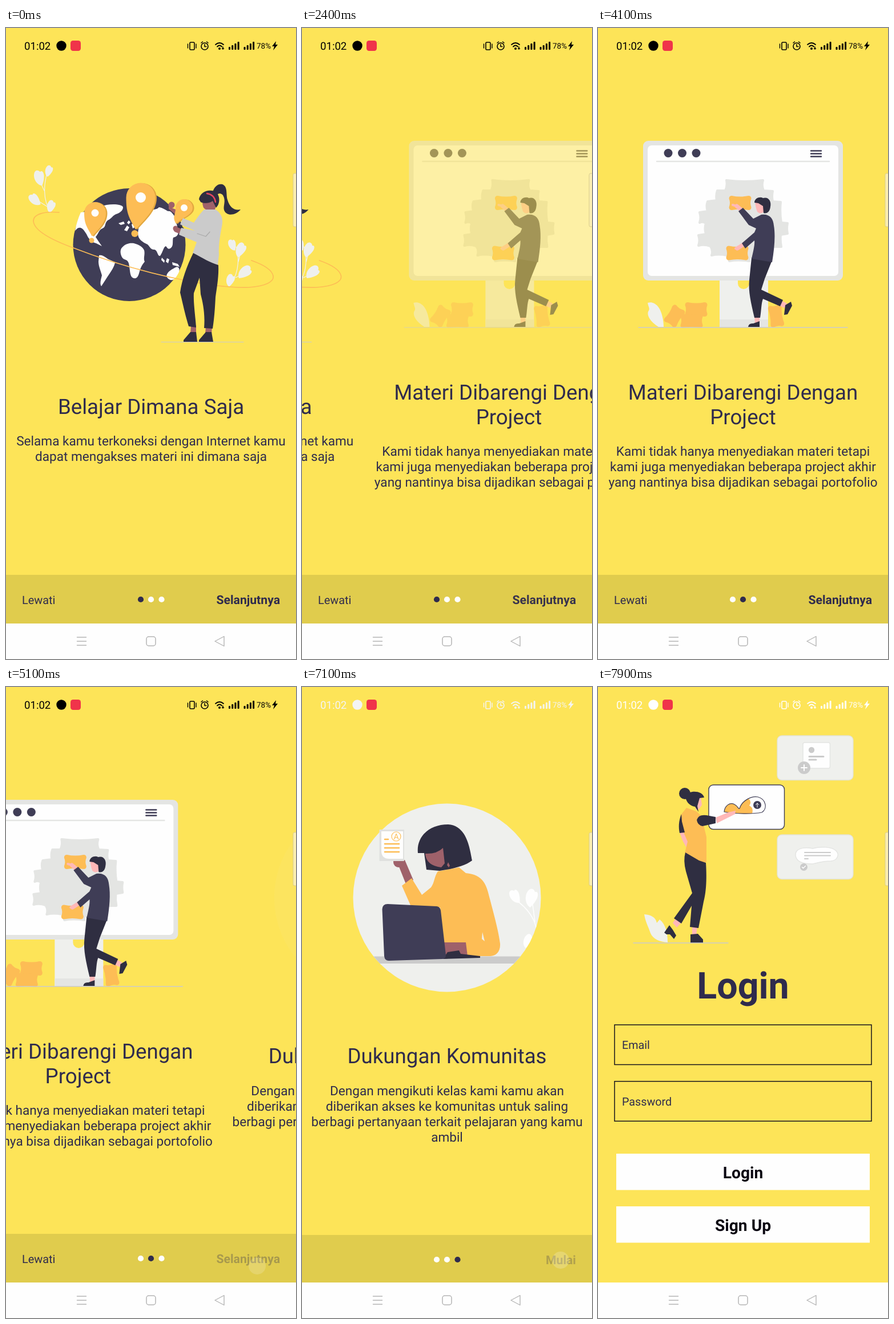
These frames come from a looping animation (508x1102 px, 8 s). An HTML page:

```html
<!DOCTYPE html>
<html lang="id">
<head>
<meta charset="utf-8">
<title>Onboarding</title>
<style>
html, body { margin: 0; width: 100%; height: 100%; overflow: hidden; background: #fde458; }
svg { display: block; width: 100%; height: 100%; font-family: Roboto, sans-serif; text-rendering: geometricPrecision; }
</style>
</head>
<body>
<svg id="stage" viewBox="0 0 508 1102"></svg>
<script>
const LOOP = 8000, W = 508;
const YELLOW = '#fde458', INK = '#2f2b4d', NAVY = '#3f3d56', DARK = '#2f2e41', AMBER = '#fdbd55',
  BROWN = '#9f616a', PINK = '#ffb8b8', PALE = '#eff0ed', GREY = '#e4e5e3', MID = '#cbcbcb', WHITE = '#fefefe';

// Markup helpers
const P = (d, fill, more = '') => `<path d="${d}" fill="${fill}" ${more}/>`;
const L = (d, color, w = 1.5, more = '') => P(d, 'none', `stroke="${color}" stroke-width="${w}" stroke-linecap="round" stroke-linejoin="round" ${more}`);
const C = (x, y, r, fill, more = '') => `<circle cx="${x}" cy="${y}" r="${r}" fill="${fill}" ${more}/>`;
const R = (x, y, w, h, rx, fill, more = '') => `<rect x="${x}" y="${y}" width="${w}" height="${h}" rx="${rx}" fill="${fill}" ${more}/>`;
const T = (x, y, size, text, more = 'text-anchor="middle"', fill = INK) => `<text x="${x}" y="${y}" font-size="${size}" fill="${fill}" ${more}>${text}</text>`;
const G = (id, body) => `<g id="${id}">${body}</g>`;
const lines = (y, step, size, ...rows) => rows.map((s, i) => T(254, y + i * step, size, s)).join('');

const leaf = (x, y, a, s = 1, fill = PALE) =>
  P('M0 14C-9 10-11-3-7-10C-4-16 2-15 4-10C9-13 10-5 8 0C6 6 3 10 0 14Z', fill, `transform="translate(${x} ${y}) rotate(${a}) scale(${s})"`);

const pin = (x, y, r, tx, ty, hole) => {
  const d = `M${x - r} ${y}a${r} ${r} 0 0 1 ${2 * r} 0C${x + r} ${y + r * .9} ${tx + r * .6} ${ty - r * .7} ${tx} ${ty}C${tx - r * .5} ${ty - r * .9} ${x - r} ${y + r} ${x - r} ${y}Z`;
  return P(d, '#e2a73f', 'transform="translate(2.5 .5)"') + P(d, AMBER) + C(x, y, hole, WHITE);
};

const brick = (x, y, w = 39, h = 25, turn = 0) => {
  const a = w / 2, b = h / 2;
  return P(`M${5 - a} ${-b}Q0 ${3 - b} ${a - 5} ${-b}Q${a} ${-b} ${a} ${5 - b}Q${a - 3} 0 ${a} ${b - 5}Q${a} ${b} ${a - 5} ${b}Q0 ${b - 3} ${5 - a} ${b}Q${-a} ${b} ${-a} ${b - 5}Q${3 - a} 0 ${-a} ${5 - b}Q${-a} ${-b} ${5 - a} ${-b}Z`,
    AMBER, `transform="translate(${x} ${y}) rotate(${turn})"`);
};

const globeArt = () =>
  L('M78 321C64 300 66 272 73 250M67 284L58 265M74 313L50 298', PALE, 1.2) +
  leaf(59, 262, -18) + leaf(75, 250, 12, .72) + leaf(51, 300, -50, .9) + leaf(79, 312, 10, .8) +
  L('M394 447C410 424 408 396 403 382M407 408L411 392M402 436L419 428', PALE, 1.2) +
  leaf(397, 379, -25, .75) + leaf(411, 388, 18, .95) + leaf(418, 427, 45) + leaf(393, 441, 10, .8) +
  C(216, 378.5, 98.5, NAVY) +
  P('M131 322C144 321 150 318 160 313L176 309C188 307 204 308 205 313C205 319 199 323 193 325C187 327 185 333 178 336C172 341 176 347 169 350C163 352 162 359 157 365L163 374L168 381L158 376C149 374 144 367 141 360C136 352 132 346 125 350L121 354C123 342 127 331 131 322Z' +
    'M163 397C170 395 175 402 182 405L191 409C190 417 184 425 178 434L167 451C164 447 166 440 168 432C166 424 162 416 162 408Z' +
    'M233 344C236 338 240 334 243 329C246 320 250 322 254 321C258 314 263 319 268 313C275 314 280 318 284 320C289 319 291 324 294 327C298 334 299 345 302 355C302 363 297 365 293 366C291 372 294 380 289 384C284 388 283 384 280 381C276 382 275 391 270 398C265 399 266 388 260 387C254 388 252 382 248 378C240 374 231 370 231 358Z' +
    'M202 385C208 377 216 375 224 376C230 378 238 380 242 388C244 396 240 402 243 408C238 414 236 418 234 425C232 433 230 438 224 437C216 435 218 423 215 411C213 403 206 406 203 400C200 394 200 389 202 385Z' +
    'M282 430C286 423 292 421 297 418C303 415 306 423 301 430C297 437 294 441 288 440C283 438 280 434 282 430Z' +
    'M273 401l5 5l-1 4l-5-5ZM282 402l4 2l-2 7l-4-3ZM291 409l10 3l3 5l-12-3ZM197 341l9-3l2 4l-7 2ZM207 353l5-8l4 3l-4 7ZM220 343l7-4l2 7l-7 4ZM212 340l3-4l3 3l-3 4Z', WHITE) +
  L('M93 322C70 320 48 324 48 337C49 355 85 372 118 384C180 408 250 428 310 440C360 450 400 454 425 453C455 451 470 443 468 433C466 422 450 413 430 406', AMBER, 1.7) +
  C(290, 309, 5.5, BROWN) + P('M285 312L300 318L296 325L285 316Z', BROWN) +
  pin(236, 296, 25.5, 227, 352, 9) + C(225.5, 359, 6, AMBER) +
  pin(156, 323, 19, 151, 364, 6.5) + C(150, 371, 4.5, AMBER) +
  pin(312, 314, 15, 298, 342, 6) +
  P('M362 287C364 278 371 271 379 273C389 277 385 290 388 300C392 314 400 319 411 317C402 328 386 329 382 318C380 310 386 302 380 292C374 286 370 290 366 296Z', DARK) +
  P('M344 303Q344 315 350 317H366L370 303L360 294Z', BROWN) +
  P('M338 299C340 286 356 280 367 286C376 293 375 307 368 314L362 302C358 306 346 307 341 304Z', DARK) +
  L('M352 289Q365 291 367 304', '#e5455f', 2.5) +
  L('M298 352L308 356', BROWN, 9) + C(297, 350, 4.5, BROWN) + L('M302 347L310 350', DARK, 3) +
  P('M347 317H367C378 324 381 334 378 347C375 362 372 380 373 396L371 414C358 410 342 403 327 393L334 374L303 361L307 349L331 354L305 343L310 332L329 340C336 330 340 324 347 317Z', MID) +
  L('M335 359L350 364L357 356', '#a9a9a9', 1.2) +
  P('M324 519h9v15h-10ZM350 521h11l-1 14h-11Z', BROWN) +
  P('M328 393C345 402 358 410 372 414C373 435 369 455 367 470C366 490 365 505 362 525L347 524C349 500 345 480 341 465L339 436L329 463C328 480 332 505 333 523L320 521C313 498 309 478 305 462C308 440 317 415 328 393Z', DARK) +
  P('M311 545L323 531H333L335 548H311ZM338 545L350 531H360L363 548H338Z', DARK) +
  L('M272 548.5H416', MID, 1.2);

const puzzleArt = () =>
  R(213, 438, 85, 85, 0, PALE) + R(213, 509, 85, 14, 0, GREY) +
  R(79, 197, 350, 244, 9, GREY) + R(87, 205, 334, 228, 7, WHITE) +
  P('M245 441h20v5a10 10 0 0 1-20 0Z', YELLOW) +
  [123, 147.5, 172].map(x => C(x, 218.5, 7.5, NAVY)).join('') +
  L('M373 214.5h18M373 219.5h18M373 224.5h18', NAVY, 2.4) + L('M103 233H405', GREY, 2.4) +
  P('M225 266Q257 270 289 266Q286 275 290 284L306 285Q304 294 306 303L320 304Q318 321 321 340L332 341Q330 350 332 359L320 361Q319 372 321 382H304Q302 390 304 398L266 400Q264 405 265 407Q246 404 230 407L226 397Q211 394 199 397Q202 389 197 381Q186 377 176 380Q179 371 176 362L189 360Q186 350 189 341Q183 337 178 340Q181 331 178 322L192 320Q189 311 192 303L208 301Q206 292 209 284H223Q227 275 225 266Z', GREY, `stroke="${GREY}" stroke-width="4" stroke-linejoin="round"`) +
  brick(249, 305.5) + brick(244, 393) +
  brick(134, 503, 25, 35, 33) + brick(172, 491.5) + brick(164, 511.5) + brick(312, 503, 24, 38, -9) +
  P('M87 480C98 476 114 486 115 522H106C93 514 85 503 88 495C92 490 88 487 87 480Z', PALE) +
  L('M255 321L243 311M258 376L244 385', PINK, 7) + L('M243 311L236 309M246 382L241 385', PINK, 4) +
  P('M275 302L290 306L292 319Q286 327 279 321Q276 314 275 302Z', PINK) +
  P('M274 305C274 297 284 294 289 297C299 294 304 303 302 312C301 321 296 325 290 323L289 311L281 306Z', DARK) +
  P('M274 503h9v13h-8ZM321 476L331 481L327 489L318 485Z', PINK) +
  P('M269 401L304 408L292 438L286 457L324 475L319 486L289 473C286 480 286 495 284 506H274C268 480 263 460 265 440Z', DARK) +
  P('M263 522Q264 515 272 516L283 512V522ZM326 501L328 484L338 478L340 485L332 500Z', DARK) +
  P('M272 333L286 326C300 324 307 332 308 345C311 362 309 385 305 409L269 403C272 390 275 378 274 371L258 385L252 376L274 357L277 350L264 344L246 320L254 314L272 333Z', NAVY) +
  L('M71 523H437', MID, 1.4);

const deskArt = () =>
  `<clipPath id="disc">${C(254, 368, 164.5, WHITE)}</clipPath>` + C(254, 368, 164.5, PALE) +
  `<g clip-path="url(#disc)">` + R(89, 470.5, 330, 12.5, 0, MID) +
  L('M374 372C396 386 408 406 411 424M408 410L403 372M414 436L396 446', WHITE, 1.5) +
  leaf(374, 366, -35, .95, WHITE) + leaf(402, 369, 8, 1.15, WHITE) + leaf(396, 444, 20, .9, WHITE) + '</g>' +
  C(169, 306, 9, BROWN) + P('M160 304L180 302L195 337L182 344L170 314Z', BROWN) +
  R(135.5, 249, 43.5, 55, 1, '#e0e1df') + P('M139 252H177V300H153Q139 300 139 286Z', WHITE) +
  C(165, 261, 8, 'none', `stroke="${AMBER}" stroke-width="1.2"`) + T(165, 266, 14, 'A', 'text-anchor="middle"', AMBER) +
  L('M145 266h6M145 274h25M145 281h25M145 288h25', AMBER, 2.6) +
  P('M238 322L275 315L287 325C318 328 323 345 329 370C337 400 345 430 347 448C348 462 340 470 330 470H290L285 448L248 446L242 385L190 381L175 347L192 334L210 363L226 350C232 342 232 330 238 322Z', AMBER) +
  P('M316 428L320 444L315 440Z', PALE) +
  P('M203 290C200 262 222 240 256 240C290 242 294 285 298 303C285 313 262 318 241 321L218 319L214 290Z', DARK) +
  P('M216 291Q236 292 247 281L250 308L244 315C228 313 217 306 216 291Z', BROWN) +
  P('M256 306L259 312L257 315L254 311Z', BROWN) +
  P('M248 446H287L290 470H248Z', BROWN) + P('M247 475L255 463L275 460L278 466L312 470V473Z', DARK) +
  P('M140.5 388Q141 379 150 379L236 383Q242 384 243 390L252 468Q252 475 246 475L152 478Q145 478 144 470Z', NAVY);

const card = (x, y) => R(x, y, 133, 77.5, 8, PALE, 'stroke="#e3e3d4" stroke-width="1.3"');

const loginArt = () => {
  const cloud = 'M221 218C222 207 231 201 239 205C245 208 246 214 248 212C253 197 270 190 280 192C295 196 297 213 287 219C272 222 240 222 221 218Z';
  return card(314, 85) + card(314, 258) +
    R(194, 171, 132.5, 77.5, 8, WHITE, `stroke="${NAVY}" stroke-width="1.4"`) +
    R(359, 97, 47.5, 45, 3, WHITE, `stroke="${GREY}" stroke-width="1.5"`) +
    C(374, 110, 5.2, MID) + L('M370 121.5h25M370 127h12', MID, 3) +
    C(361, 141, 11, MID) + L('M356 141h10M361 136v10', WHITE, 2) +
    P('M346 294C345 282 360 279 376 282C390 278 410 279 417 286C424 293 419 303 408 304C395 304 388 306 376 309C362 309 347 306 346 294Z', WHITE, `stroke="${GREY}" stroke-width="1.5"`) +
    L('M362 289h45M362 294.5h45M362 300h6', MID, 2) + C(360.5, 314.5, 6.5, MID) + L('M357.5 314.5l2 2l4-4', WHITE, 1.5) +
    P(cloud, WHITE) +
    P('M221 218C222 207 231 201 239 205C245 208 246 214 248 212C250 204 256 198 264 195Q270 201 265 207Q273 211 270 221C250 222 230 221 221 218Z', AMBER) +
    L(cloud, NAVY, 1.2) +
    C(279, 206, 7, NAVY) + L('M279 210v-7M276.5 205.5l2.5-2.5l2.5 2.5', WHITE, 1) +
    P('M173 193L180 192L182 206L177 213L171 215Z', PINK) +
    C(152, 186, 10, DARK) +
    P('M153 189C160 180 183 180 186 193L178 194L174 208L176 218L170 209C160 208 153 199 153 189Z', DARK) +
    P('M143 254L152 252L158 269L157 284L149 270ZM131 412L137 403L147 410L138 420ZM165 416h9l-2 18h-7Z', PINK) +
    P('M147 221L155 211L172 217L181 225L190 262V306L180 306C168 300 158 292 152 290L157 270L146 245C142 235 142 228 147 221Z', AMBER) +
    P('M146 222C141 235 141 245 143 255L152 254L147 235Z', DARK) +
    P('M206 228L228 219L241 216L240 222L208 238Z', PINK) +
    P('M173 232Q176 222 190 224L206 227V238L183 243Q174 241 173 232Z', DARK) +
    P('M153 289L177 303L189 307C191 340 189 360 185 375L176 421L161 419L164 382L146 413L133 404L165 360L154 322Q149 303 153 289Z', DARK) +
    P('M81 397C93 398 101 402 103 412L108 406C118 414 122 428 122 446C108 445 96 440 92 430C88 418 83 410 81 397Z', PALE) +
    P('M116 429L125 416L131 424L137 434L133 440L126 432L120 432ZM162 447V432L175 431L184 441V447Z', DARK) +
    L('M62 447H228', MID, 1.4);
};

const bars = x => [5, 8, 11, 14].map((h, i) => R(x + i * 5.2, 38 - h, 3, h, 1, 'currentColor')).join('');

const statusBar = () => {
  const ink = 'currentColor';
  return T(32, 37.5, 18.6, '01:02', '', ink) + C(97, 31, 8.7, ink) +
    R(322, 25, 8, 13, 1.5, 'none', `stroke="${ink}" stroke-width="1.6"`) + L('M318.5 28v7M333 28v7', ink, 1.4) +
    C(348, 32, 6, 'none', `stroke="${ink}" stroke-width="1.6"`) + L('M348 28.5v4h3M342 26l2.5-2M354 26l-2.5-2', ink, 1.5) +
    L('M367 29Q374 23 381 29M370 32.5Q374 28.5 378 32.5', ink, 1.8) + C(374, 36, 2, ink) +
    L('M380 33v4M378.5 36h3', ink, 1.5) + bars(390) + bars(416.5) +
    T(439, 36, 13.5, '78%', '', ink) + P('M473 23L466 32H470L468 39L476 29H472Z', ink);
};

const field = (y, label) => R(29, y, 450, 69.5, 0, 'none', 'stroke="#15131c" stroke-width="1.5"') + T(42, y + 42, 19.75, label, '');
const button = (y, label) => R(32, y, 444, 63.5, 0, WHITE) + T(254, y + 43, 28.2, label, 'text-anchor="middle" font-weight="700"', '#0b0812');

const TITLE = 36.69, BODY = 22.58;
stage.innerHTML =
  R(0, 0, W, 1102, 0, YELLOW) +
  G('page0', globeArt() + lines(674, 43, TITLE, 'Belajar Dimana Saja') +
    lines(729, 27, BODY, 'Selama kamu terkoneksi dengan Internet kamu', 'dapat mengakses materi ini dimana saja')) +
  G('page1', G('art1', puzzleArt()) + lines(649, 43, TITLE, 'Materi Dibarengi Dengan', 'Project') +
    lines(747, 27, BODY, 'Kami tidak hanya menyediakan materi tetapi', 'kami juga menyediakan beberapa project akhir', 'yang nantinya bisa dijadikan sebagai portofolio')) +
  G('page2', G('art2', deskArt()) + lines(657, 43, TITLE, 'Dukungan Komunitas') +
    lines(713, 27, BODY, 'Dengan mengikuti kelas kami kamu akan', 'diberikan akses ke komunitas untuk saling', 'berbagi pertanyaan terkait pelajaran yang kamu', 'ambil')) +
  R(0, 955, W, 90, 0, '#e0cc4d', 'id="bar"') + T(28, 1006, 19.9, 'Lewati', 'id="skip"') +
  G('dots', [236, 254, 272.5].map(x => C(x, 0, 5.1, WHITE)).join('')) +
  T(480, 1006, 21.2, '', 'id="next" text-anchor="end" font-weight="700"') +
  G('login', R(0, 0, W, 1042, 0, YELLOW) + G('art3', loginArt()) +
    T(254, 544, 64.5, 'Login', 'text-anchor="middle" font-weight="700"') +
    field(590, 'Email') + field(688.7, 'Password') + button(815, 'Login') + button(907, 'Sign Up')) +
  R(0, 1040, W, 62, 0, WHITE) +
  L('M124.5 1064h16M124.5 1071h16M124.5 1078h16', '#b5b5b5', 1.4) +
  R(246, 1063, 16, 16, 4, 'none', 'stroke="#b5b5b5" stroke-width="1.5"') + L('M366 1071L382 1062.5V1079.5Z', '#b5b5b5', 1.4) +
  G('status', statusBar()) + R(113, 22, 18, 18, 4.5, '#f0344a') +
  R(503, 254, 9, 93, 2.5, '#fbeeb0', 'stroke="#d9cc8a" stroke-width="1"') +
  C(440, 1011, 15, '#fff', 'id="touch"');

const $ = id => document.getElementById(id);
const clamp = v => Math.max(0, Math.min(1, v));
const sine = p => (1 - Math.cos(Math.PI * clamp(p))) / 2;
const quad = p => (p = clamp(p), p < .5 ? 2 * p * p : 1 - 2 * (1 - p) * (1 - p));
const outCubic = p => 1 - (1 - clamp(p)) ** 3;

const SLIDE = 350, IMAGE_DELAY = 103, IMAGE_FADE = 300, OPEN = 7120;
const taps = [
  { down: 2110, up: 2158, x: 440, y: 1008 },
  { down: 4890, up: 4984, x: 440, y: 1011 },
  { down: 6890, up: 7000, x: 453, y: 1001 }
];

function pressOpacity(t, tap) {
  const low = 1 - .8 * quad((Math.min(t, tap.up) - tap.down) / 80);
  return low + (1 - low) * quad((t - tap.up - 50) / 250);
}

function draw(t) {
  const [a, b] = taps;
  const scroll = sine((t - a.up) / SLIDE) + sine((t - b.up) / SLIDE);
  for (let i = 0; i < 3; i++) $('page' + i).setAttribute('transform', `translate(${(i - scroll) * W} 0)`);
  $('art1').setAttribute('opacity', clamp((t - a.up - IMAGE_DELAY) / IMAGE_FADE));
  $('art2').setAttribute('opacity', clamp((t - b.up - IMAGE_DELAY) / IMAGE_FADE));

  const page = (t >= a.up + SLIDE) + (t >= b.up + SLIDE), last = page === 2, drop = last ? 2 : 0;
  $('bar').setAttribute('y', 955 + drop);
  $('skip').setAttribute('opacity', last ? 0 : 1);
  $('next').textContent = last ? 'Mulai' : 'Selanjutnya';
  $('next').setAttribute('y', 1006 + drop);
  $('dots').setAttribute('transform', `translate(0 ${998 + drop})`);
  [...$('dots').children].forEach((dot, i) => dot.setAttribute('fill', i === page ? INK : WHITE));

  const tap = taps.filter(p => t >= p.down).pop();
  $('next').setAttribute('opacity', tap ? pressOpacity(t, tap) : 1);
  $('touch').setAttribute('opacity', tap ? .2 * clamp((tap.up + 220 - t) / 120) : 0);
  if (tap) {
    $('touch').setAttribute('cx', tap.x);
    $('touch').setAttribute('cy', tap.y);
  }

  const tint = Math.round(254 * clamp((t - 7005) / 100));
  $('status').setAttribute('color', `rgb(${tint},${tint},${tint})`);
  const open = (t - OPEN) / 400, scale = .9 + .1 * outCubic(open);
  $('login').setAttribute('opacity', clamp(open * 2));
  $('login').setAttribute('transform', `translate(254 520) scale(${scale}) translate(-254 -520)`);
  $('art3').setAttribute('opacity', clamp((t - OPEN - 60) / IMAGE_FADE));
}

const start = performance.now();
function frame() {
  draw((performance.now() - start) % LOOP);
  requestAnimationFrame(frame);
}
draw(0);
frame();
</script>
</body>
</html>
```
